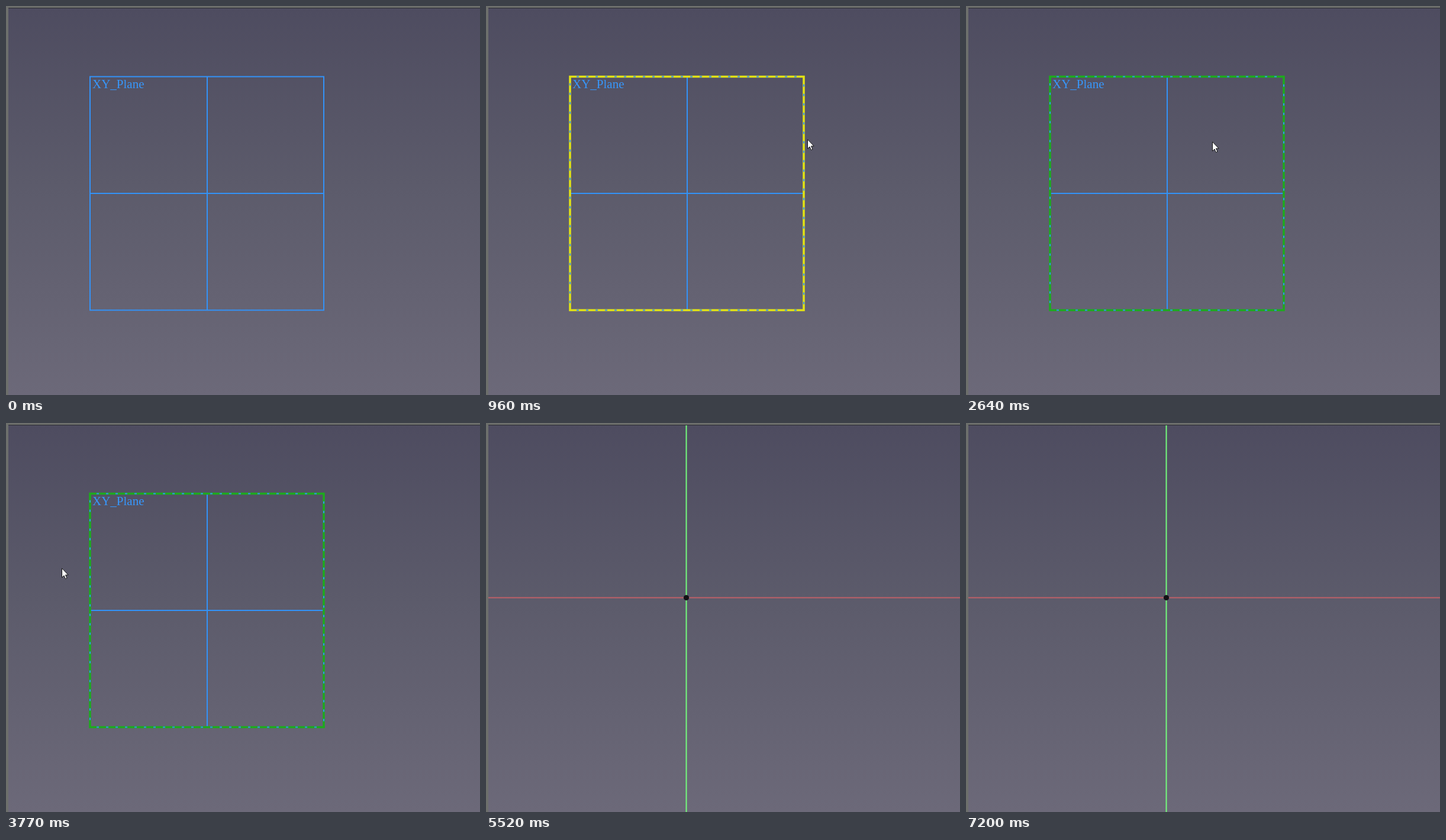
Recreate the animation shown at these times as an HTML page. Size 801 by 658 pixels, loop 8000 ms.

```html
<!DOCTYPE html>
<html lang="en">
<head>
<meta charset="utf-8">
<title>Sketch plane</title>
<style>
  html, body { margin: 0; width: 100%; height: 100%; overflow: hidden; background: #6d6f6c; }
  svg { display: block; width: 801px; height: 658px; }
  text { font: 21px "Liberation Serif", "Times New Roman", serif; fill: #3797fb; }
  .blue { fill: none; stroke: #3392f7; stroke-width: 2; }
  #outline { fill: none; stroke-width: 3.6; }
</style>
</head>
<body>
<svg viewBox="0 0 801 658">
  <defs>
    <linearGradient id="sky" x1="0" y1="0" x2="0" y2="1">
      <stop offset="0" stop-color="#4e4c60"/>
      <stop offset=".46" stop-color="#5c5b6b"/>
      <stop offset="1" stop-color="#6c6979"/>
    </linearGradient>
  </defs>
  <rect width="801" height="658" fill="#6d6f6c"/>
  <rect x="4" y="3" width="797" height="1" fill="#2c2c32"/>
  <rect x="4" y="4" width="797" height="654" fill="url(#sky)"/>

  <g id="plane">
    <path class="blue" d="M142 119.5H537V514.5H142ZM340 119.5V514.5M142 317H537"/>
    <g id="picked">
      <path id="outline" d="M142 119.5H537V514.5H142Z"/>
      <path class="blue" stroke-dasharray="4 12"
        d="M153 119.5H535M153 514.5H535M142 130.5V512M537 132.5V512"/>
    </g>
    <text x="146" y="139">XY_Plane</text>
  </g>

  <g id="sketch">
    <path d="M4 295.5H801" stroke="#bd6068" stroke-width="2"/>
    <path d="M338.5 4V658" stroke="#74fc7c" stroke-width="2"/>
    <circle cx="338.5" cy="295.5" r="4.6" fill="#131316"/>
  </g>

  <path id="cursor" fill="#fff" stroke="#111" stroke-width="1"
    d="M.5 .8V16.4L4 13L6.4 18.5L8.9 17.4L6.5 12H11.2Z"/>
</svg>
<script>
  const LOOP = 8000;
  const $ = id => document.getElementById(id);
  const slowing = p => 1 - (1 - p) ** 2;
  const gaining = p => p * p;
  const smooth = p => p * p * (3 - 2 * p);
  const linear = p => p;

  // Pointer moves: start, end, steps, from, to, easing; held until the next row
  const moves = [
    [260, 760, 7, [721, 587], [543, 227], slowing],
    [830, 960, 2, [543, 226], [543, 225], linear],
    [1550, 1690, 2, [542, 225], [540, 223], linear],
    [2570, 2710, 2, [536, 224], [56, 243], gaining],
    [2780],
    [3770, 4180, 6, [94, 245], [360, 358], smooth],
    [5170, 5450, 4, [374, 361], [765, 440], gaining],
    [5520]
  ];

  // Outline colour from each time on
  const HOVER = "#e1e114", CHOSEN = "#1eaa1e";
  const outlines = [[0, null], [830, HOVER], [1620, CHOSEN], [2570, HOVER], [2640, CHOSEN]];

  const latest = (rows, t) => rows.filter(r => r[0] <= t).pop();
  const show = (el, on) => { el.style.display = on ? "" : "none"; };

  function pointer(t) {
    const row = latest(moves, t);
    if (!row || row.length < 2) return null;
    const [start, end, steps, from, to, ease] = row;
    const step = Math.floor((t - start) / (end - start) * steps + 0.02);
    const p = ease(Math.min(1, step / steps));
    return from.map((v, i) => Math.round(v + (to[i] - v) * p));
  }

  function draw(t) {
    const sketching = t >= 4580;
    show($("plane"), !sketching);
    show($("sketch"), sketching);

    const colour = latest(outlines, t)[1];
    show($("picked"), colour);
    if (colour) $("outline").setAttribute("stroke", colour);

    const at = pointer(t);
    show($("cursor"), at);
    if (at) $("cursor").setAttribute("transform", `translate(${at})`);
  }

  const begin = performance.now();
  function tick() {
    draw((performance.now() - begin) % LOOP);
    requestAnimationFrame(tick);
  }
  tick();
</script>
</body>
</html>
```
